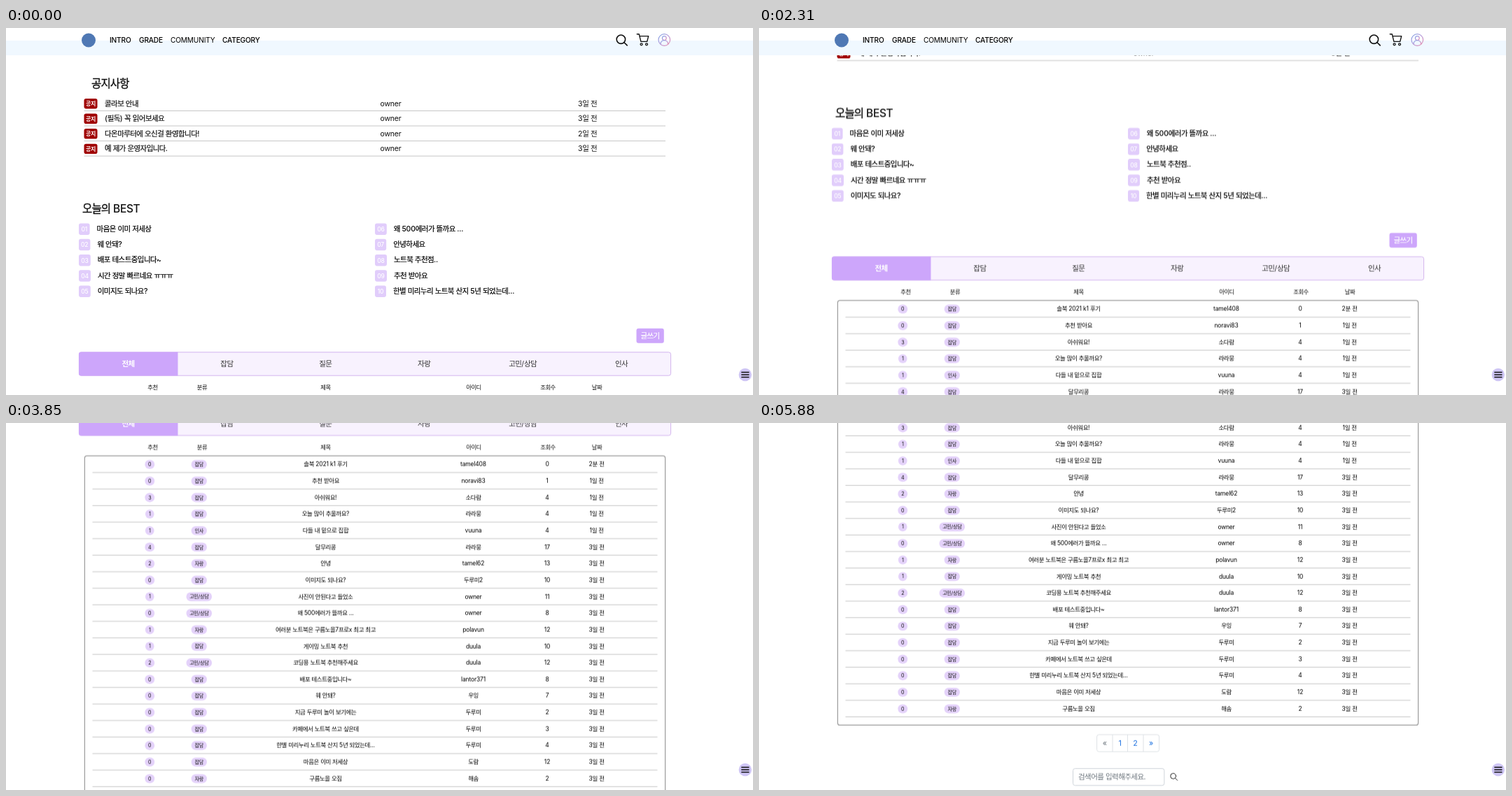
These frames come from a looping animation (1067 by 525 pixels, 7490 ms). An HTML page:

```html
<!DOCTYPE html>
<html lang="ko">
<head>
<meta charset="utf-8">
<title>게시판</title>
<style>
  html, body { margin: 0; width: 100%; height: 100%; overflow: hidden; background: #fff; }
  svg { display: block; width: 1067px; height: 525px; }
  text { font-family: Inter, "Noto Sans CJK KR", "Noto Sans CJK", sans-serif; white-space: pre; }
</style>
</head>
<body>
<svg id="stage" viewBox="0 0 1067 525">
  <defs>
    <linearGradient id="avatar" x1="0" y1="0" x2="1" y2="1">
      <stop offset="0" stop-color="#7fa4e6"/>
      <stop offset=".5" stop-color="#b597d8"/>
      <stop offset="1" stop-color="#e98fae"/>
    </linearGradient>
  </defs>
  <g id="page"></g>
  <g id="header">
    <rect width="1067" height="18" fill="#fff"/>
    <rect y="18" width="1067" height="21" fill="#f0f8ff"/>
    <circle cx="118" cy="17.5" r="10" fill="#4f78b4"/>
    <g fill="none" stroke="#111" stroke-linecap="round" stroke-linejoin="round">
      <path stroke-width="1.6" d="M884.6 16.2a6.200 6.200 0 1 1-12.400 0a6.200 6.200 0 1 1 12.400 0M883 20.700l4.200 4.200"/>
      <path stroke-width="1.4" d="M901.300 8.800h3l2.600 10.600h8.800l2-7.800h-12.600"/>
      <circle cx="907.6" cy="23.300" r="1.500" stroke-width="1.300"/>
      <circle cx="915" cy="23.300" r="1.500" stroke-width="1.300"/>
    </g>
    <g fill="none" stroke="url(#avatar)" stroke-width="1.2">
      <circle cx="940.3" cy="17" r="8.3"/>
      <circle cx="940.3" cy="14.6" r="2.9"/>
      <path d="M935 23.300c0-7.600 10.600-7.600 10.600 0"/>
    </g>
  </g>
  <circle cx="1055.800" cy="496" r="9.200" fill="#cfc6f5"/>
  <path d="M1050.300 492.500h11.200M1050.300 496h11.200M1050.300 499.500h11.200" stroke="#111" stroke-width="1.700"/>
</svg>
<script>
const LOOP = 7490;
const NS = "http://www.w3.org/2000/svg";
const $ = id => document.getElementById(id);
const page = $("page"), header = $("header");

function add(parent, tag, attrs) {
  const el = document.createElementNS(NS, tag);
  for (const k in attrs) el.setAttribute(k, attrs[k]);
  return parent.appendChild(el);
}

// y is the vertical middle; Hangul runs are set tighter and slightly thickened when medium
function label(x, y, size, str, o = {}) {
  const fill = o.fill || "#111", weight = o.weight || 400;
  const text = add(o.to || page, "text", {
    x, y: y + size * .36, "font-size": size, fill, "font-weight": weight,
    "text-anchor": o.mid ? "middle" : "start"
  });
  for (const run of str.match(/[가-힣ㄱ-ㅣ]+|[^가-힣ㄱ-ㅣ]+/g)) {
    const hangul = /[가-힣ㄱ-ㅣ]/.test(run);
    add(text, "tspan", {
      "letter-spacing": (hangul ? -.056 : -.02) * size,
      ...(hangul && weight === 500 && { stroke: fill, "stroke-width": size * .02 })
    }).textContent = run;
  }
}
const mid = (x, y, size, str, o) => label(x, y, size, str, { ...o, mid: true });

const box = (x, y, width, height, rx, fill, stroke = "none", sw = 1) =>
  add(page, "rect", { x, y, width, height, rx, fill, stroke, "stroke-width": sw });
const line = (x1, x2, y, stroke = "#c6c6c6") =>
  add(page, "path", { d: `M${x1} ${y}H${x2}`, stroke, "stroke-width": 1 });

// Navigation
[[148, "INTRO"], [190, "GRADE"], [235, "COMMUNITY"], [309, "CATEGORY"]].forEach(([x, s]) =>
  label(x, 17.8, 10.2, s, { to: header, weight: s === "COMMUNITY" ? 400 : 500, fill: "#000" }));

// Notices
label(122, 79.5, 15.5, "공지사항", { weight: 500 });
["콜라보 안내", "(필독) 꼭 읽어보세요", "다온마루터에 오신걸 환영합니다!", "예 제가 운영자입니다."].forEach((s, i) => {
  const y = 108 + i * 21.55;
  box(111.5, y - 7, 19, 14.4, 2.8, "#a00000");
  mid(121, y + .3, 8, "공지", { fill: "#fff", weight: 700 });
  label(141, y, 10.5, s, { weight: 500 });
  label(534.5, y, 10.5, "owner");
  label(817, y, 10.5, i === 2 ? "2일 전" : "3일 전");
  line(111.5, 942, y + 10.5);
});

// Best posts
label(109, 258, 15.5, "오늘의 BEST", { weight: 500 });
const best = [
  ["마음은 이미 저세상", 15.6], ["웨 안돼?", 16.4], ["배포 테스트중입니다~", 16.8],
  ["시간 정말 빠르네요 ㅠㅠㅠ", 17], ["이미지도 되나요?", 16.8],
  ["왜 500에러가 뜰까요 ...", 16.8], ["안녕하세요", 16.2], ["노트북 추천점..", 17],
  ["추천 받아요", 17], ["한별 미리누리 노트북 산지 5년 되었는데...", 16]
];
best.forEach(([s, w], i) => {
  const x = i < 5 ? 104 : 527, y = 287.5 + (i % 5) * 22.25;
  box(x, y - 8, w, 16.4, 2.8, "#e1cdfb");
  mid(x + w / 2, y + .6, 8.5, String(i + 1).padStart(2, "0"), { fill: "#fff", weight: 500 });
  label(x + w + 10, y - .3, 10.5, s, { fill: "#000", weight: 500 });
});

// Write button and tabs
box(900.5, 429.8, 39.3, 21, 3, "#cda6fb");
mid(920, 440.3, 10.5, "글쓰기", { fill: "#fff", weight: 500 });
box(104.4, 463.8, 845.2, 33.4, 3, "#f8f2fe", "#d0aeed", .9);
add(page, "path", { d: "M245.500 463.400H107a3 3 0 0 0-3 3v28.200a3 3 0 0 0 3 3H245.500z", fill: "#cda6fb" });
["전체", "잡담", "질문", "자랑", "고민/상담", "인사"].forEach((s, i) =>
  mid(174.5 + i * 140.9, 480.5, 10.5, s, i ? { fill: "#333" } : { fill: "#fff", weight: 700 }));

// Post table
const heads = { 추천: 209.5, 분류: 280, 제목: 456.5, 아이디: 668, 조회수: 774, 날짜: 844 };
for (const s in heads) mid(heads[s], 514, 8.4, s);
box(112.4, 526.4, 829.2, 485, 3, "none", "#9b9b9b", 1.2);

const posts = `0|잡담|솔북 2021 k1 후기|tamel408|0|2분
0|잡담|추천 받아요|noravi83|1|1일
3|잡담|아쉬워요!|소다람|4|1일
1|잡담|오늘 많이 추울까요?|라라뭉|4|1일
1|인사|다들 내 밑으로 집합|vuuna|4|1일
4|잡담|달무리콩|라라뭉|17
2|자랑|안녕|tamel62|13
0|잡담|이미지도 되나요?|두루미2|10
1|고민/상담|사진이 안된다고 들었소|owner|11
0|고민/상담|왜 500에러가 뜰까요 ...|owner|8
1|자랑|여러분 노트북은 구름노을7프로x 최고 최고|polavun|12
1|잡담|게이밍 노트북 추천|duula|10
2|고민/상담|코딩용 노트북 추천해주세요|duula|12
0|잡담|배포 테스트중입니다~|lantor371|8
0|잡담|웨 안돼?|우잉|7
0|잡담|지금 두루미 놀이 보기에는|두루미|2
0|잡담|카페에서 노트북 쓰고 싶은데|두루미|3
0|잡담|한별 미리누리 노트북 산지 5년 되었는데...|두루미|4
0|잡담|마음은 이미 저세상|도람|12
0|자랑|구름노을 오짐|해솜|2`;

posts.split("\n").forEach((row, i) => {
  const [likes, kind, title, user, views, age = "3일"] = row.split("|");
  const y = 538.3 + i * 23.65;
  const lw = likes === "1" ? 12.6 : 13.8, kw = kind.length > 2 ? 36.6 : 22.2;
  box(205.3 - lw / 2, y - 6, lw, 12.8, 6.2, "#e4d2fa");
  mid(205.3, y + .4, 7.2, likes);
  box(275.8 - kw / 2, y - 6, kw, 12.8, 6.2, "#e4d2fa");
  mid(275.8, y + .4, 7.2, kind);
  [[456.5, title], [667.5, user], [773, views], [843.5, age + " 전"]].forEach(([x, s]) =>
    mid(x, y, 8.5, s, { fill: "#000" }));
  line(123.5, 930.5, y + 11.9);
});

// Pagination and search
box(482.6, 1025, 89, 24.4, 3, "#fff", "#dee2e6");
[505, 526.5, 549].forEach(x => add(page, "path", { d: `M${x} 1025v24.4`, stroke: "#dee2e6" }));
[["«", 493.7], ["1", 515.7], ["2", 537.5], ["»", 560]].forEach(([s, x], i) =>
  mid(x, 1037.3, 10.8, s, { fill: i ? "#1a6fe0" : "#6c757d" }));
box(448.5, 1073.5, 130.4, 24.2, 3, "#fff", "#ced4da");
label(456, 1085.3, 10.5, "검색어를 입력해주세요.", { fill: "#6c757d" });
add(page, "path", {
  d: "M595.600 1084.300a3.900 3.900 0 1 1-7.800 0a3.900 3.900 0 1 1 7.800 0M594.500 1087.200l3.200 3.200",
  fill: "none", stroke: "#222", "stroke-width": 1, "stroke-linecap": "round"
});

// Scroll bursts: start time, then the offset after each 70 ms tick
const bursts = [
  [0, 0],
  [910, 2, 8, 15, 20], [1260, 23],
  [1470, 33.3, 45, 55, 61],
  [1820, 70, 86, 100, 108],
  [2310, 136.6, 149, 164, 180, 197, 214, 231, 247, 263, 278, 289.8],
  [3080, 303, 318], [3430, 365, 405, 435],
  [3850, 479.4, 500], [4130, 512, 520], [4550, 529, 531],
  [4830, 536, 542, 548, 552, 553.9],
  [5320, 562, 567], [5880, 579.3]
];
// Header offset as it leaves
const leave = [[0, 0], [2450, 10, 25, 40]];

function play(el, table) {
  const steps = table.flatMap(([t, ...ys]) => ys.map((y, i) => [t + i * 70, y]));
  steps.push([LOOP, steps[steps.length - 1][1]]);
  el.animate(steps.map(([t, y]) => ({
    offset: t / LOOP, transform: `translate(0px, ${-y}px)`, easing: "step-end"
  })), { duration: LOOP, iterations: Infinity });
}
play(page, bursts);
play(header, leave);
</script>
</body>
</html>
```
